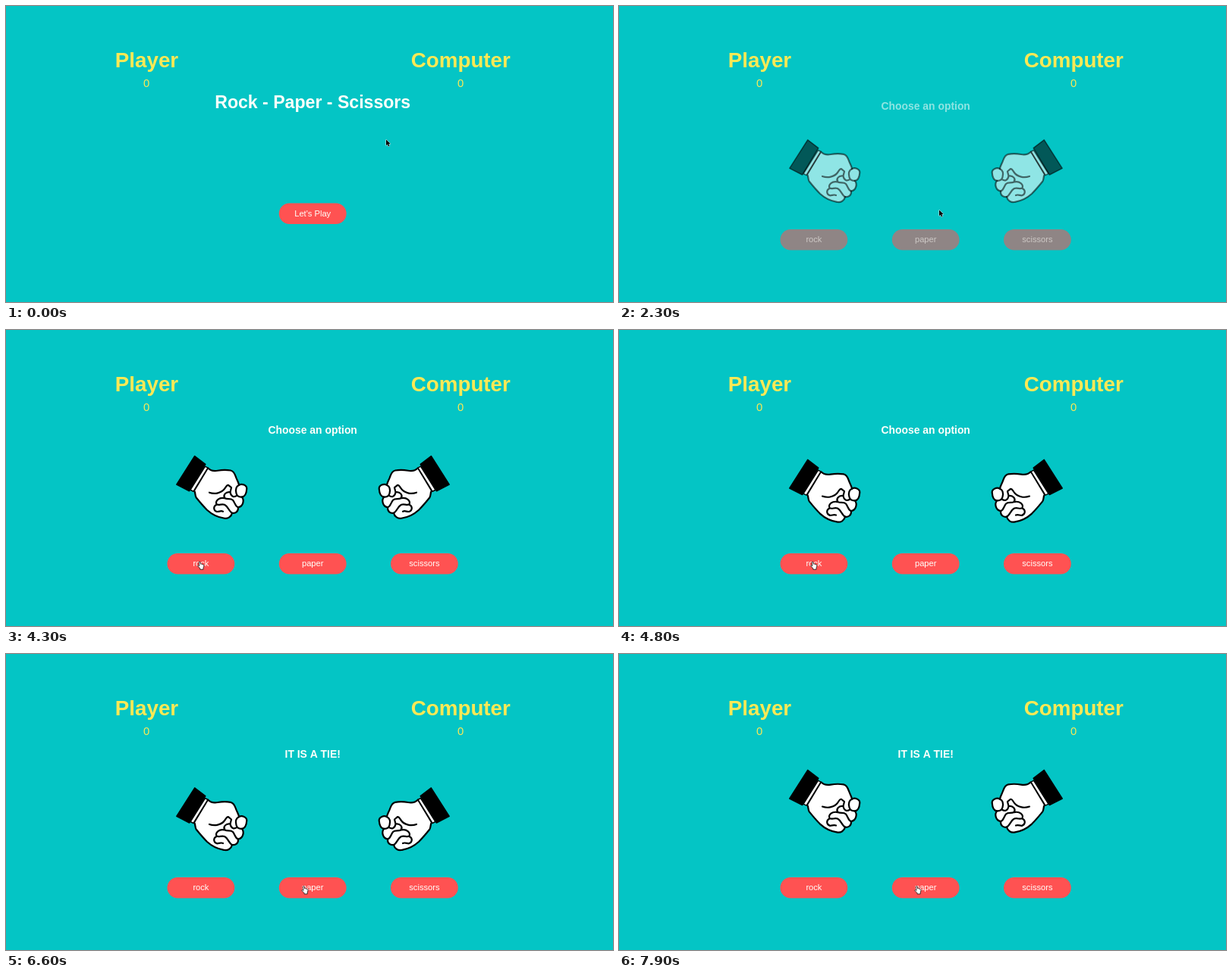
Recreate the animation shown at these times as an HTML page with a canvas. Size 800 by 391 pixels, loop 8000 ms.

```html
<!DOCTYPE html>
<html lang="en">
<head>
<meta charset="utf-8">
<title>Rock - Paper - Scissors</title>
<style>
  html, body { margin: 0; width: 100%; height: 100%; overflow: hidden; background: #04c5c5; }
  canvas { display: block; }
</style>
</head>
<body>
<canvas id="stage" width="800" height="391"></canvas>
<script>
const ctx = document.getElementById('stage').getContext('2d');
const LOOP = 8000, STEP = 100;
const BG = '#04c5c5', YELLOW = '#fbe955', RED = '#ff5252', WHITE = '#fffffa';
const FADE = 1640, SHAKES = [3755, 6750], SHAKE_TIME = 2000, LIFT = 29.2;
const MIRROR = 809;

const clamp = v => Math.min(1, Math.max(0, v));
const smooth = x => x * x * (3 - 2 * x);

// The CSS "ease" curve, cubic-bezier(.25, .1, .25, 1)
function ease(x) {
  if (x <= 0 || x >= 1) return clamp(x);
  const bez = (a, b, s) => 3 * a * s * (1 - s) ** 2 + 3 * b * s * s * (1 - s) + s ** 3;
  let lo = 0, hi = 1;
  for (let i = 0; i < 24; i++) {
    const mid = (lo + hi) / 2;
    if (bez(.25, .25, mid) < x) lo = mid; else hi = mid;
  }
  return bez(.1, 1, lo);
}

// Four lifts of the fists, eased between keyframes
const KEYS = [0, .15, .25, .35, .5, .65, .75, .85, 1];
function lift(t) {
  const start = SHAKES.find(s => t >= s && t < s + SHAKE_TIME);
  if (start === undefined) return 0;
  const p = (t - start) / SHAKE_TIME;
  const i = KEYS.findIndex((k, n) => p >= k && p < KEYS[n + 1]);
  const e = ease((p - KEYS[i]) / (KEYS[i + 1] - KEYS[i]));
  return -LIFT * (i % 2 ? 1 - e : e);
}

// Pointer moves: start, end, destination
const MOVES = [
  [0, 100, 487, 193],
  [400, 1150, 422, 269.5],
  [2350, 3200, 254.3, 306],
  [6000, 6600, 391.5, 306.7]
];
function pointerAt(t) {
  let x = 501, y = 176.5;
  for (const [a, b, tx, ty] of MOVES) {
    const k = smooth(clamp((t - a) / (b - a)));
    x += (tx - x) * k;
    y += (ty - y) * k;
  }
  return { x, y };
}

const BUTTONS = {
  start: ["Let's Play", 404.2, 274.2],
  rock: ['rock', 256.9, 308.7],
  paper: ['paper', 404.2, 308.7],
  scissors: ['scissors', 551.4, 308.7]
};
const inside = (p, [, x, y]) => Math.abs(p.x - x) < 44 && Math.abs(p.y - y) < 13.5;

function text(str, x, y, size, color, bold) {
  ctx.font = `${bold ? 'bold ' : ''}${size}px "Liberation Sans", Arial, sans-serif`;
  ctx.textAlign = 'center';
  ctx.fillStyle = color;
  ctx.fillText(str, x, y);
}

function button([label, x, y]) {
  ctx.fillStyle = RED;
  ctx.beginPath();
  ctx.roundRect(x - 44.4, y - 13.8, 88.8, 27.6, 13.8);
  ctx.fill();
  text(label, x, y + 3.6, 11.15, WHITE);
}

const cuff = new Path2D('M248.7 176.8L262.8 187.6L241.6 223L224.8 214.4Z');
const band = new Path2D('M262.5 190.5L266 192.5L247 223.5L243 221.5Z');
const palm = new Path2D(`M266 192.5C270 196.5 274 197 279 196C285 195 291 195 296 195.8
  C300 196.5 301.5 200 303 204.5C304 208 306.5 211 307 215.2C311 212.5 317.5 215.5 317.3 220
  C317 224 316.5 230.5 310.8 230.8C314.5 235 312.5 243.5 306 244.5C306.5 250 302.5 253 298 252
  C297 257 292.5 260 287 258.8C279 257.5 271 253.5 265 248C259 242 255 237 250.8 231.8
  C248.8 229 250 225 248 222.5Z`);
const creases = new Path2D(`M268 225C275 227.5 284 226 288.5 219.5C290 217 291 215 293 215.2
  L297 218.5L295.5 224.5C296.5 230.5 300.5 231.5 304 229.2
  M307 215.2C302.8 217 302.5 222 303.5 226C304.5 230 308 231 310.8 230.8
  M295.5 224.5C289.5 223.5 285.5 228.5 288.5 232.5C292 234.5 296 232 299 235
  C302 238.5 302 243.5 306 244.5
  M288 232.5C281 231 275.5 235.5 277.5 240.5C280.5 242.5 284 239.5 288 241
  C293 243.5 294 250.5 298 252
  M277.5 241C273 243 273 248.5 278 250.3C281 250.5 283 248.5 286 250`);

function fist() {
  ctx.lineJoin = ctx.lineCap = 'round';
  ctx.strokeStyle = '#000';
  ctx.fillStyle = '#fff';
  ctx.lineWidth = 2.2;
  ctx.fill(palm);
  ctx.stroke(palm);
  ctx.stroke(creases);
  ctx.fill(band);
  ctx.lineWidth = 1.5;
  ctx.stroke(band);
  ctx.fillStyle = '#000';
  ctx.fill(cuff);
  ctx.stroke(cuff);
}

function fists(dy) {
  ctx.save();
  ctx.translate(0, dy);
  fist();
  ctx.translate(MIRROR, 0);
  ctx.scale(-1, 1);
  fist();
  ctx.restore();
}

const arrow = new Path2D('M0 0V7.8L1.8 6.2L3 9L4.4 8.4L3.2 5.7L5.6 5.5Z');
const finger = new Path2D(`M0 .8C0-.3 1.7-.3 1.8 .8L2.2 3.2C3 2.6 3.7 2.9 3.9 3.6
  C4.6 3.1 5.3 3.5 5.5 4.2C6.5 4 6.6 5 6.4 6.2L5.7 8.4V10.3H1.5V9L-1.6 5.8
  C-1.8 4.8-.6 4.6 .6 5.7Z`);

function pointer(p, hover) {
  ctx.save();
  ctx.translate(p.x, p.y);
  ctx.lineJoin = 'round';
  ctx.lineWidth = hover ? .8 : 1;
  ctx.strokeStyle = hover ? '#111' : '#e8f4f4';
  ctx.fillStyle = hover ? '#fff' : '#000';
  if (hover) {
    ctx.fill(finger);
    ctx.stroke(finger);
  } else {
    ctx.stroke(arrow);
    ctx.fill(arrow);
  }
  ctx.restore();
}

function draw(t) {
  const { start, ...options } = BUTTONS;
  const choices = Object.values(options);
  ctx.globalAlpha = 1;
  ctx.fillStyle = BG;
  ctx.fillRect(0, 0, 800, 391);

  for (const [name, x] of [['Player', 185.5], ['Computer', 599.3]]) {
    text(name, x, 81, 27.75, YELLOW, true);
    text('0', x - .3, 106.6, 14.8, YELLOW);
  }

  ctx.globalAlpha = 1 - ease((t - FADE) / 500);
  text('Rock - Paper - Scissors', 404.2, 135.2, 23.1, WHITE, true);
  button(start);

  ctx.globalAlpha = ease((t - FADE - 500) / 500);
  const tie = t >= SHAKES[0] + SHAKE_TIME;
  text(tie ? 'IT IS A TIE!' : 'Choose an option', 404.2, 137, 13.9, WHITE, true);
  fists(lift(t));
  choices.forEach(button);

  ctx.globalAlpha = 1;
  const p = pointerAt(t);
  const active = t < FADE ? [start] : choices;
  pointer(p, active.some(b => inside(p, b)));
}

const origin = performance.now();
function tick() {
  const t = (performance.now() - origin) % LOOP;
  draw(Math.floor(t / STEP) * STEP);
  requestAnimationFrame(tick);
}
tick();
</script>
</body>
</html>
```
